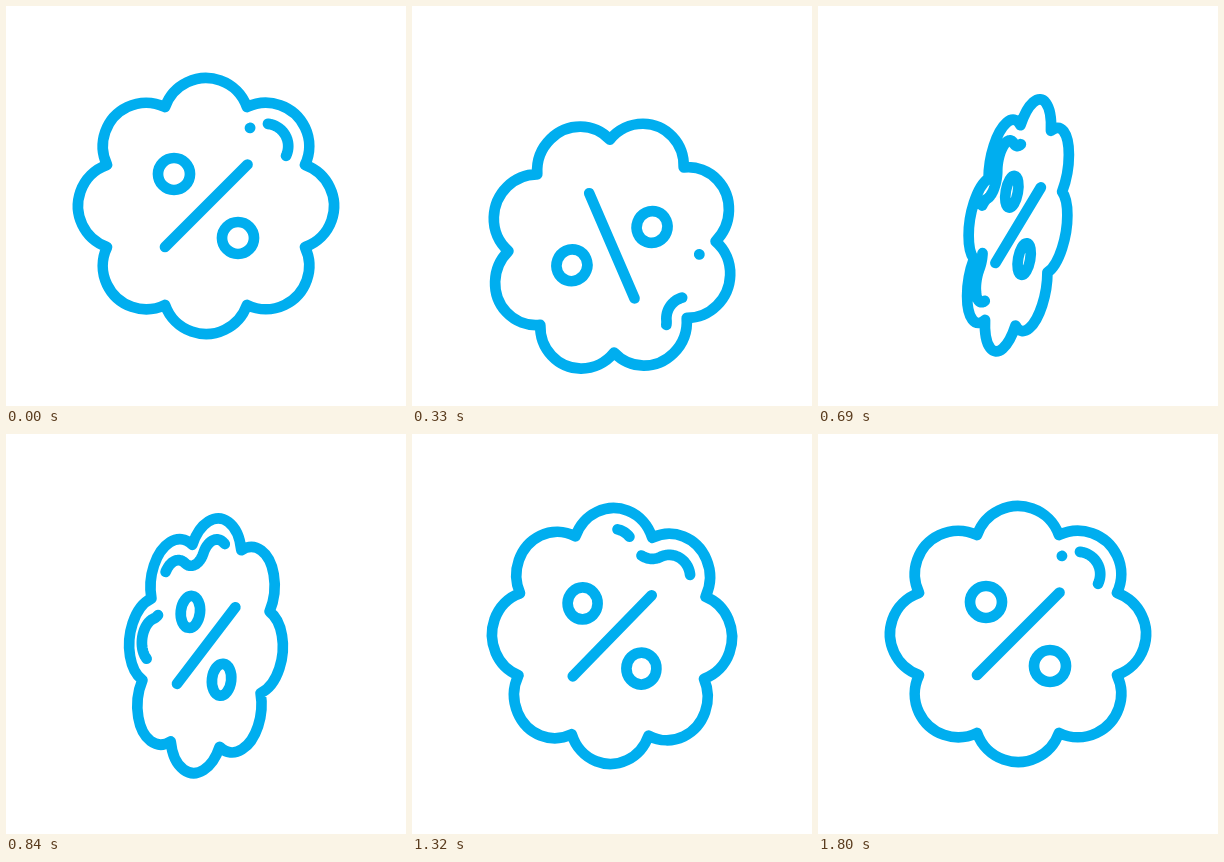
Write an HTML page with a canvas that moves like this. It is 400 by 400 pixels and loops after 1.83 s.

```html
<!DOCTYPE html>
<html>
<head>
<meta charset="utf-8">
<style>
  html, body { margin: 0; width: 100%; height: 100%; overflow: hidden; background: #fff; }
  canvas { display: block; }
</style>
</head>
<body>
<canvas id="stage" width="400" height="400"></canvas>
<script>
const ctx = document.getElementById('stage').getContext('2d');
const LOOP = 1830, STEP = 30, RAD = Math.PI / 180;

// Badge geometry: eight lobes meeting in notches.
const LOBE_C = 84.6, LOBE_R = 43.4, NOTCH = 107, INSET = 21;
const HALF = 70.6 * RAD;                        // half sweep of a lobe
const IN_R = LOBE_R - INSET;
const LOBE_HALF = HALF * IN_R;
const PERIOD = 2 * LOBE_HALF + (2 * HALF - 45 * RAD) * INSET;

// Cubic-bezier easing, solved by bisection.
function ease(u, [x1, y1, x2, y2]) {
  const at = (p, a, b) => 3 * p * (1 - p) * ((1 - p) * a + p * b) + p ** 3;
  let lo = 0, hi = 1;
  for (let i = 0; i < 24; i++) {
    const mid = (lo + hi) / 2;
    if (at(mid, x1, x2) < u) lo = mid; else hi = mid;
  }
  return at(lo, y1, y2);
}

// Goes from 0 up to 1 at the peak time, then back to 0 at the end time.
function swing(t, peak, end, out, back) {
  return t < peak ? ease(t / peak, out) : 1 - ease(Math.min(1, (t - peak) / (end - peak)), back);
}

const SETTLE = [0.2, 0, 0, 1];
const drop = t => 41.3 * swing(t, 390, 1800, [0.2, 0, 0.46, 1], SETTLE);
const tilt = t => 22 * swing(t, 390, 1800, [0.33, 0, 0.67, 1], SETTLE);
const flip = t => 1 - 2 * swing(t, 300, 1720, [0.4, 0, 0.67, 1], [0.1, 0, 0, 1]);

// A glint's end slides back along the wave, then returns to rest.
const slide = (rest, far, peak) => t =>
  rest - far * swing(t, peak, peak + 1290, [0.1, 0.4, 0.6, 0.8], [0.2, 0, 0.3, 1]);
const glints = [
  [slide(56.5, 400, 537), slide(56.5, 340, 500)],
  [slide(75, 285, 510), slide(118, 275, 345)]
];

function turn(x, y, a) {
  return [x * Math.cos(a) - y * Math.sin(a), x * Math.sin(a) + y * Math.cos(a)];
}

// Point at length s along the wave inset from the badge edge.
function wavePoint(s) {
  const k = Math.round(s / PERIOD), d = s - k * PERIOD, a = k * 45 * RAD;
  if (Math.abs(d) <= LOBE_HALF) {
    const q = d / IN_R;
    return turn(IN_R * Math.sin(q), -LOBE_C - IN_R * Math.cos(q), a);
  }
  const side = Math.sign(d), q = (d - side * PERIOD / 2) / INSET;
  return turn(INSET * Math.sin(q), INSET * Math.cos(q) - NOTCH, a + side * 22.5 * RAD);
}

function addBadge() {
  for (let k = 0; k < 8; k++) {
    const a = (k * 45 - 90) * RAD;
    ctx.arc(LOBE_C * Math.cos(a), LOBE_C * Math.sin(a), LOBE_R, a - HALF, a + HALF);
  }
  ctx.closePath();
}

function addPercent() {
  ctx.moveTo(41.5, -41.5);
  ctx.lineTo(-41, 41);
  for (const c of [-32, 32]) {
    ctx.moveTo(c + 16, c);
    ctx.arc(c, c, 16, 0, 2 * Math.PI);
  }
}

// Never shorter than a dot.
function addGlint(from, to) {
  const len = Math.max(0.2, to - from), n = Math.ceil(len / 2);
  ctx.moveTo(...wavePoint(from));
  for (let i = 1; i <= n; i++) ctx.lineTo(...wavePoint(from + len * i / n));
}

function draw(t) {
  ctx.resetTransform();
  ctx.clearRect(0, 0, 400, 400);
  ctx.beginPath();
  ctx.translate(200, 200 + drop(t));
  ctx.rotate(tilt(t) * RAD);
  ctx.scale(flip(t), 1);
  addBadge();
  addPercent();
  for (const [from, to] of glints) addGlint(from(t), to(t));
  // Stroke outside the transform so the line weight stays constant.
  ctx.resetTransform();
  ctx.strokeStyle = '#00aeef';
  ctx.lineWidth = 10.7;
  ctx.lineCap = ctx.lineJoin = 'round';
  ctx.stroke();
}

const start = performance.now();
function frame() {
  const t = (performance.now() - start) % LOOP;
  draw(Math.floor(t / STEP) * STEP);
  requestAnimationFrame(frame);
}
frame();
</script>
</body>
</html>
```
